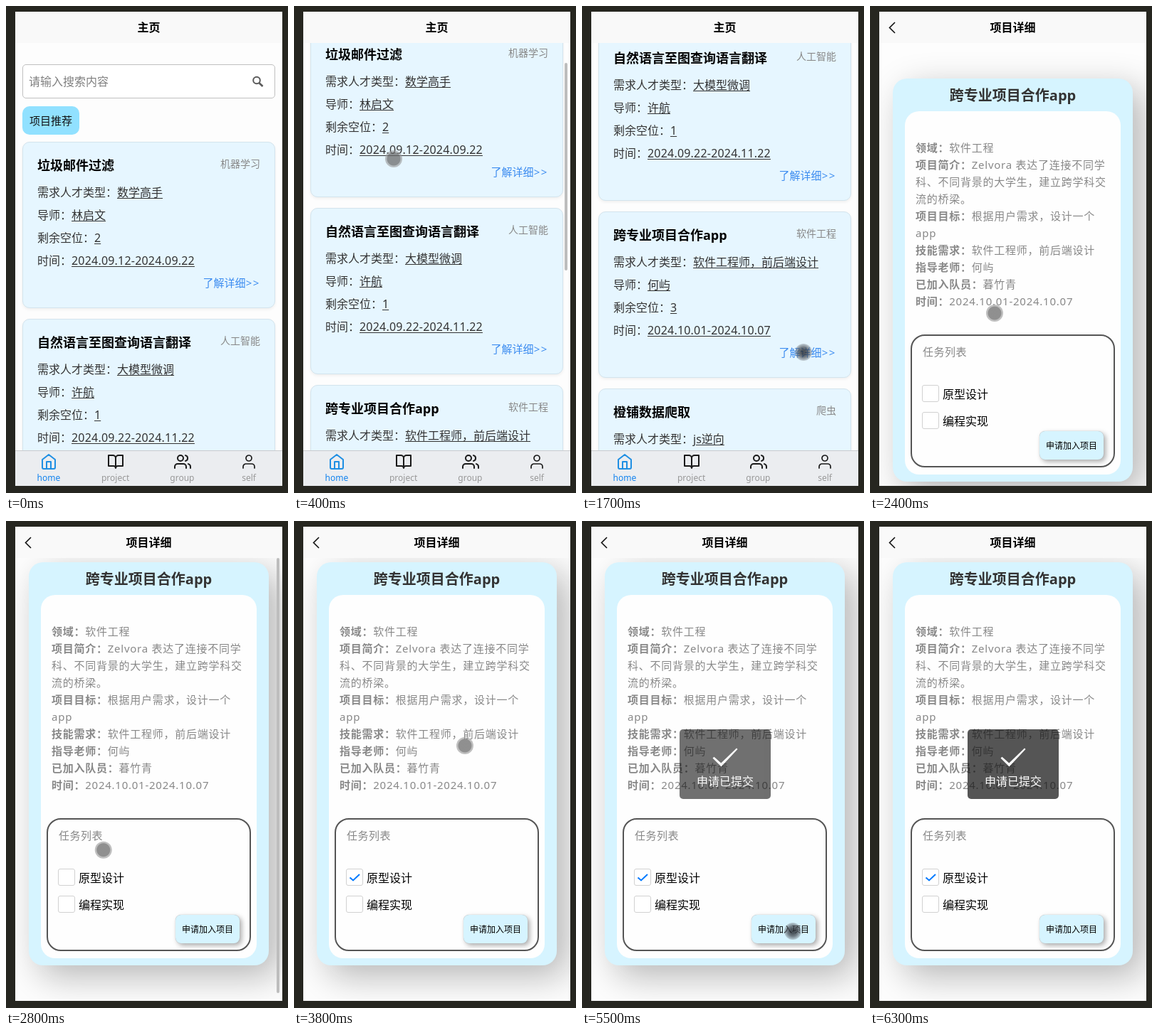
Write an HTML page that moves like this. It is 396x685 px and loops after 6.9 s.

```html
<!DOCTYPE html>
<html lang="zh-CN">
<head>
<meta charset="utf-8">
<title>项目</title>
<style>
  html, body { margin: 0; width: 100%; height: 100%; overflow: hidden; background: #262620; }
  body { font: 16px/24px "Noto Sans", "Noto Sans CJK SC", "Noto Sans CJK", sans-serif; color: #333; }
  div, span, svg { box-sizing: border-box; }
  #stage { position: absolute; left: 0; top: 0; width: 396px; height: 685px; overflow: hidden; background: #262620; }
  .abs, .page, .scroll, .t, .sheet, .tasks, .tab { position: absolute; }
  .t { white-space: nowrap; line-height: 24px; }
  .page { left: 13px; top: 8px; width: 375px; height: 667px; overflow: hidden; background: #fdfdfd; }
  .scroll { left: 0; top: 0; width: 375px; height: 1480px; }
  .head { position: absolute; left: 0; top: 0; width: 375px; height: 44px; background: #f9f9f9;
    font: bold 16px/44px "Noto Sans", "Noto Sans CJK SC", sans-serif; color: #000; text-align: center; }
  .thumb { position: absolute; left: 367px; width: 4px; border-radius: 2px; background: #bdbdbd; }

  .search { left: 10px; top: 74px; width: 355px; height: 48px; border: 1px solid #c0c0c0; border-radius: 5px; background: #fff; }
  .tag { left: 10px; top: 133px; width: 80px; height: 40px; border-radius: 10px; background: #91e1ff;
    font-size: 15px; line-height: 40px; text-align: center; color: #111; }
  .item { left: 10px; width: 355px; height: 234px; border: 1px solid #d3e4ed; border-radius: 10px;
    background: #e6f6ff; box-shadow: 0 2px 4px rgba(0,0,0,.06); }
  .item .name { left: 20px; top: 20px; font-size: 18px; font-weight: bold; color: #000; }
  .item .kind { right: 20px; top: 18px; font-size: 14px; color: #888; }
  .item .more { right: 20px; top: 185px; font-size: 15px; color: #3c8cf0; }
  .item u { text-underline-offset: 2px; text-decoration-thickness: 1px; }
  .date { letter-spacing: .2px; }

  .tabs { left: 0; top: 617px; width: 375px; height: 50px; border-top: 1px solid #c9cbce; background: #ebedf0; }
  .tab { top: 0; width: 25%; height: 50px; text-align: center; font-size: 12px; color: #999; }
  .tab svg { position: absolute; left: 35px; top: 3px; }
  .tab span { position: absolute; left: 0; width: 100%; top: 26px; }

  .panel { left: 19px; top: 94px; width: 337px; height: 567px; border-radius: 20px; background: #d6f4ff;
    box-shadow: 15px 15px 50px #b5b5b5; }
  .panel .title { left: 0; width: 337px; top: 12px; text-align: center; font-size: 20px; font-weight: bold; }
  .sheet { left: 17px; top: 46px; width: 303px; height: 511px; border-radius: 20px; background: #fefefe; }
  .info { left: 32px; font-size: 15px; letter-spacing: .75px; color: #888; }
  .tasks { left: 25px; top: 360px; width: 287px; height: 187px; border: 2px solid #555; border-radius: 20px; }
  .tasks .label { left: 15px; top: 10px; font-size: 15px; letter-spacing: .5px; color: #888; }
  .box { left: 14px; width: 24px; height: 24px; border: 1px solid #d1d1d1; border-radius: 3px; background: #fff; }
  .todo { left: 43px; color: #000; }
  .join { left: 179px; top: 134px; width: 90px; height: 40px; border-radius: 8px; background: #d6f4ff; color: #000;
    font-size: 12px; line-height: 41px; text-align: center; box-shadow: 3px 3px 7px #aaa, 0 0 1px #999; }

  #toast { left: 137px; top: 293px; width: 128px; height: 98px; border-radius: 5px; background: rgba(17,17,17,.71); color: #fff; }
  #toast .t { left: 0; width: 128px; top: 61px; text-align: center; }
  #dot { left: -12px; top: -12px; width: 24px; height: 24px; border-radius: 50%;
    background: radial-gradient(circle, rgba(105,105,105,.74) 9px, rgba(150,150,150,.6) 10px); }
  #dot.down { background: radial-gradient(circle, rgba(40,44,50,.8) 3px, rgba(70,75,82,.72) 7px, rgba(130,135,140,.35) 12px); }
</style>
</head>
<body>
<div id="stage">
  <div class="page" id="home">
    <div class="scroll" id="list">
      <div class="abs search">
        <div class="t" style="left:8px;top:11px;color:#808080">请输入搜索内容</div>
        <svg class="abs" style="left:320px;top:14px" width="20" height="20" fill="none" stroke="#5a5a5a">
          <circle cx="8" cy="7.5" r="4.8" stroke-width="2"/><path d="M11.5 11.2L16.5 16" stroke-width="2.6"/>
        </svg>
      </div>
      <div class="abs tag">项目推荐</div>
    </div>
    <div class="head">主页</div>
    <div class="abs tabs" id="tabs"></div>
    <div class="thumb" id="listThumb"></div>
  </div>
  <div class="page" id="detail">
    <div class="scroll" id="sheet">
      <div class="abs panel" id="panel">
        <div class="t title">跨专业项目合作app</div>
        <div class="sheet"></div>
        <div class="tasks" id="tasks">
          <div class="t label">任务列表</div>
          <div class="abs join">申请加入项目</div>
        </div>
      </div>
    </div>
    <div class="head">项目详细
      <svg class="abs" style="left:12px;top:13px" width="14" height="20" fill="none" stroke="#111" stroke-width="1.6"><path d="M10 2L2.5 9.5L10 17"/></svg>
    </div>
    <div class="thumb" id="sheetThumb"></div>
  </div>
  <div class="abs" id="toast">
    <svg class="abs" style="left:44px;top:24px" width="40" height="32"><path d="M2.5 16.5L4.5 14.8L14.3 23.5L36 2.5L37.5 4L14.5 28.5Z" fill="#fff"/></svg>
    <div class="t">申请已提交</div>
  </div>
  <div class="abs" id="dot"></div>
</div>
<script>
const LOOP = 6900, STEP = 100;
const $ = id => document.getElementById(id);
const add = (id, html) => $(id).insertAdjacentHTML('beforeend', html);

const items = [
  ['垃圾邮件过滤', '机器学习', '数学高手', '林启文', 2, '2024.09.12-2024.09.22'],
  ['自然语言至图查询语言翻译', '人工智能', '大模型微调', '许航', 1, '2024.09.22-2024.11.22'],
  ['跨专业项目合作app', '软件工程', '软件工程师，前后端设计', '何屿', 3, '2024.10.01-2024.10.07'],
  ['橙铺数据爬取', '爬虫', 'js逆向']
];
const labels = ['需求人才类型', '导师', '剩余空位', '时间'];
items.forEach(([name, kind, ...values], i) => {
  const rows = values.map((v, r) =>
    `<div class="t" style="left:20px;top:${58 + 32 * r}px">${labels[r]}：<u class="${r === 3 ? 'date' : ''}">${v}</u></div>`).join('');
  add('list', `<div class="abs item" style="top:${183 + 249 * i}px">
    <div class="t name">${name}</div><div class="t kind">${kind}</div>${rows}
    <div class="t more">了解详细<span style="letter-spacing:1.6px">&gt;&gt;</span></div></div>`);
});

// Head and shoulders, centred on x
const person = (x, w) => `<circle cx="${x}" cy="7" r="4"/><path d="M${x + w} 21v-2a4 4 0 0 0-4-4h${8 - 2 * w}a4 4 0 0 0-4 4v2"/>`;
const tabs = {
  home: '<path d="M3 9l9-7 9 7v11a2 2 0 0 1-2 2H5a2 2 0 0 1-2-2zM9 22V12h6v10"/>',
  project: '<path d="M12 7a4 4 0 0 0-4-4H2v15h7a3 3 0 0 1 3 3V7a4 4 0 0 1 4-4h6v15h-7a3 3 0 0 0-3 3"/>',
  group: person(9, 8) + '<path d="M23 21v-2a4 4 0 0 0-3-3.9M16 3.1a4 4 0 0 1 0 7.8"/>',
  self: person(12, 8)
};
Object.entries(tabs).forEach(([name, icon], i) => add('tabs',
  `<div class="tab" style="left:${25 * i}%;${i ? '' : 'color:#1484ee'}">
    <svg width="24" height="24" fill="none" stroke="${i ? '#1a1a1a' : '#1f8fe3'}"
      stroke-width="${name === 'self' ? 1.7 : 2}" stroke-linecap="round" stroke-linejoin="round">${icon}</svg>
    <span>${name}</span></div>`));

const info = [
  ['领域', '软件工程'], ['项目简介', 'Zelvora 表达了连接不同学'],
  ['', '科、不同背景的大学生，建立跨学科交'], ['', '流的桥梁。'],
  ['项目目标', '根据用户需求，设计一个'], ['', 'app'],
  ['技能需求', '软件工程师，前后端设计'], ['指导老师', '何屿'],
  ['已加入队员', '暮竹青'], ['时间', '2024.10.01-2024.10.07']
];
info.forEach(([key, text], i) => add('panel',
  `<div class="t info" style="top:${85 + 24 * i}px">${key ? `<b>${key}：</b>` : ''}${text}</div>`));

['原型设计', '编程实现'].forEach((text, i) => add('tasks',
  `<div class="abs box" style="top:${69 + 38 * i}px">${i ? '' :
    '<svg id="check" class="abs" style="left:0;top:0" width="22" height="22" fill="none" stroke="#007aff" stroke-width="2"><path d="M4.5 11.5L9 15.5L18 7"/></svg>'}</div>
  <div class="t todo" style="top:${70 + 38 * i}px">${text}</div>`));

const ramp = (t, a, b) => Math.min(1, Math.max(0, (t - a) / (b - a)));
const smooth = p => p * p * (3 - 2 * p);

// Pointer stops: arrival time, x, y, rest
const stops = [
  [100, 138, 371, 0], [400, 140, 215, 0], [1400, 311, 487, 400], [2200, 155, 352, 0],
  [2400, 175, 432, 0], [3300, 89, 501, 200], [3800, 240, 316, 0], [4200, 284, 487, 0],
  [4400, 294, 590, 100], [4900, 296, 577, 600], [5900, 384, 202, 0], [6100, 332, 135, 0], [6300, 412, 33, 0]
];
function pointer(t) {
  const i = Math.max(1, stops.findIndex(s => s[0] > t));
  const [t0, x0, y0, rest] = stops[i - 1], [t1, x1, y1] = stops[i];
  const p = ramp(t, t0 + rest, t1);
  return [x0 + (x1 - x0) * p, y0 + (y1 - y0) * p];
}
const pressed = t => (t >= 1700 && t < 1900) || (t >= 3300 && t < 3500) || (t >= 4900 && t < 5600);

function scrollTo(id, y, content, alpha) {
  const scale = 652 / content, bar = $(id + 'Thumb').style;
  $(id).style.transform = `translateY(${-Math.round(y)}px)`;
  bar.top = 4 + y * scale + 'px';
  bar.height = 667 * scale + 'px';
  bar.opacity = alpha;
}

function draw(t) {
  const inDetail = t >= 1900;
  $('home').style.display = inDetail ? 'none' : '';
  $('detail').style.display = inDetail ? '' : 'none';

  scrollTo('list', 400 * smooth(ramp(t, 100, 700) ** 1.23), 1489, ramp(t, 0, 100) - ramp(t, 1000, 1300));
  scrollTo('sheet', 44 * smooth(ramp(t, 2400, 2800)), 711, ramp(t, 2400, 2500) - ramp(t, 3200, 3500));

  $('check').style.opacity = t >= 3400 ? 1 : 0;
  $('toast').style.opacity = 1 - (1 - ramp(t, 5300, 5630)) ** 2;

  const live = t >= 100 && t < 6300;
  $('dot').style.display = live ? '' : 'none';
  if (!live) return;
  const [x, y] = pointer(t);
  $('dot').style.transform = `translate(${x}px, ${y}px)`;
  $('dot').className = pressed(t) ? 'abs down' : 'abs';
}

const start = performance.now();
function tick(now) {
  const t = Math.max(0, now - start) % LOOP;
  draw(Math.floor(t / STEP) * STEP);
  requestAnimationFrame(tick);
}
draw(0);
requestAnimationFrame(tick);
</script>
</body>
</html>
```
